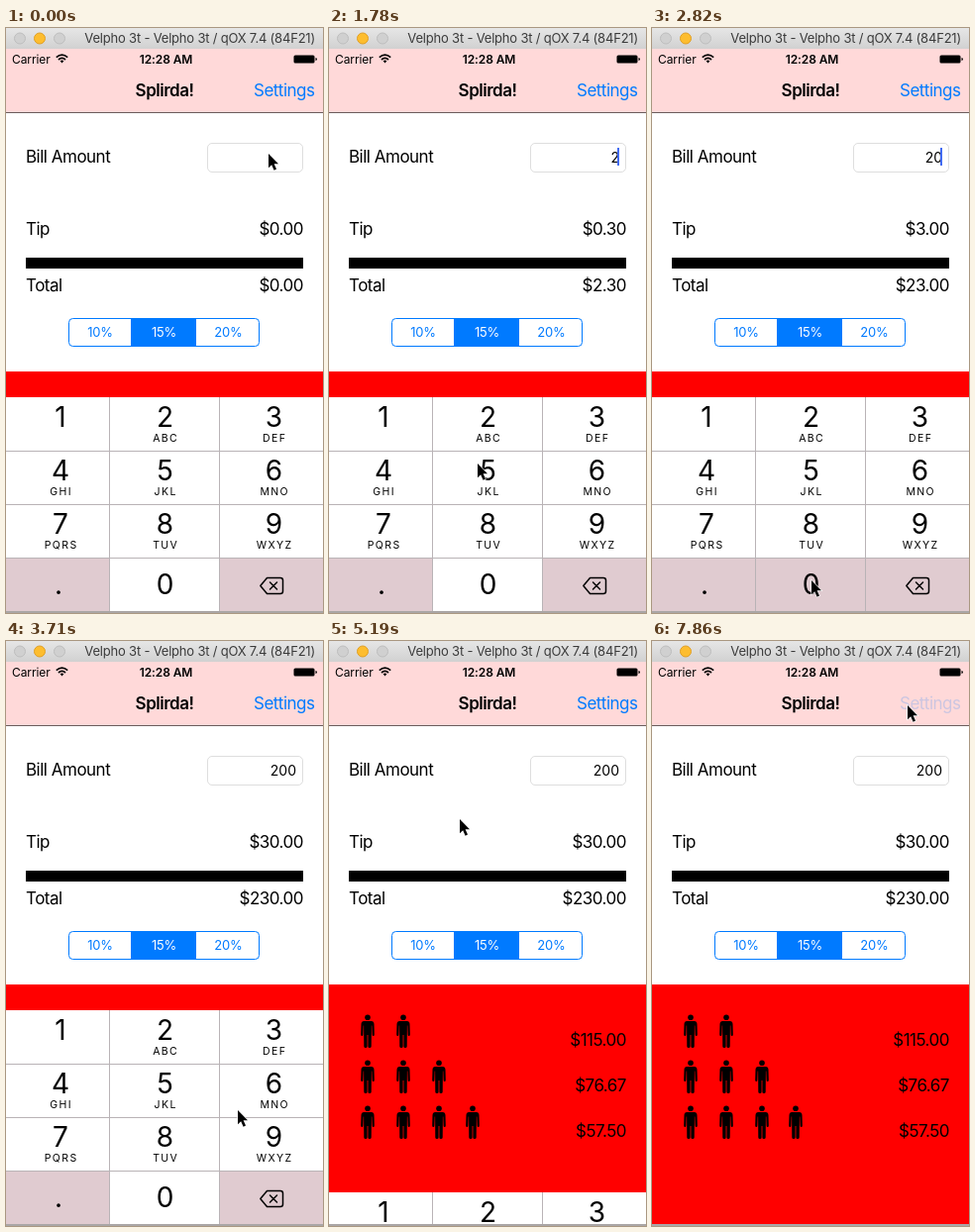
These frames come from a looping animation (320 by 591 pixels, 8 s). An HTML page:

```html
<!DOCTYPE html>
<html lang="en">
<head>
<meta charset="utf-8">
<title>Tip calculator</title>
<style>
  html, body { margin: 0; width: 100%; height: 100%; overflow: hidden; background: #fff; }
  svg { display: block; width: 320px; height: 591px; }
  text { font: 17px Inter, Roboto, sans-serif; letter-spacing: -.5px; }
  .end { text-anchor: end; }
  .mid { text-anchor: middle; }
  .bold { font-weight: 600; }
  .blue { fill: #007aff; }
  .small { font-size: 12px; letter-spacing: -.1px; }
  .window { font-size: 13px; letter-spacing: -.2px; fill: #3b3b3b; }
  .field { font-size: 14px; letter-spacing: 0; }
  .segment { font-size: 13px; letter-spacing: -.2px; }
  .digit { font-size: 28px; letter-spacing: 0; }
  .letters { font-size: 10.5px; letter-spacing: 1.4px; }
</style>
</head>
<body>
<svg viewBox="0 0 320 591">
  <defs>
    <linearGradient id="chrome" x2="0" y2="1">
      <stop stop-color="#e6e6e6"/><stop offset="1" stop-color="#d1d1d1"/>
    </linearGradient>
    <clipPath id="screen"><rect y="347" width="320" height="242"/></clipPath>
    <g id="person">
      <circle cy="3.2" r="2.8"/>
      <path d="M-3.8 7H3.8Q6.3 7 6.5 10L6.8 20.5Q6.8 22 5.7 22T4.6 20.5L4.3 11.5H3.9L3.7 32.5Q3.6 34 2 34T.4 32.5V21H-.4V32.5Q-.4 34-2 34T-3.7 32.5L-3.9 11.5H-4.3L-4.6 20.5Q-4.6 22-5.7 22T-6.8 20.5L-6.5 10Q-6.3 7-3.8 7Z"/>
    </g>
  </defs>

  <rect width="320" height="591" fill="#fff"/>
  <rect width="320" height="21" fill="url(#chrome)"/>
  <g stroke="#bebebe" fill="#d0d0d0">
    <circle cx="14" cy="10.5" r="5.5"/>
    <circle cx="34" cy="10.5" r="5.5" fill="#fdbd2f" stroke="#e0a028"/>
    <circle cx="54" cy="10.5" r="5.5"/>
  </g>
  <text class="window end" x="312" y="15">Velpho 3t - Velpho 3t / qOX 7.4 (84F21)</text>

  <rect y="21" width="320" height="64" fill="#ffd9d9"/>
  <rect y="85" width="320" height="1" fill="#6b5c5c"/>
  <text class="small" x="6" y="35.5">Carrier</text>
  <g fill="none" stroke="#000" stroke-width="1.7">
    <path d="M50.8 29.6Q56.5 24.6 62.2 29.6M53 32Q56.5 28.9 60 32"/>
    <path d="M54.6 33.3Q56.5 31.7 58.4 33.3L56.5 35.4Z" fill="#000" stroke="none"/>
  </g>
  <text class="small bold mid" x="161.5" y="35.5">12:28 AM</text>
  <rect x="290.5" y="27.5" width="21" height="8" rx="1.5" fill="#000"/>
  <path d="M312.5 30Q314 30.3 314 31.5T312.5 33Z"/>
  <text class="bold mid" x="160" y="69">Splirda!</text>
  <text id="settings" class="blue end" x="311.5" y="69">Settings</text>

  <text x="20" y="135.5">Bill Amount</text>
  <rect x="203.5" y="116.5" width="96" height="29" rx="4.5" fill="#fff" stroke="#dedede"/>
  <text id="bill" class="field end" x="293" y="135.5"></text>
  <rect id="caret" x="291" y="121" width="2" height="18" fill="#426bf2"/>
  <text x="20" y="208.5">Tip</text>
  <text id="tip" class="end" x="300" y="208.5"></text>
  <rect x="20" y="232" width="280" height="11"/>
  <text x="20" y="265.5">Total</text>
  <text id="total" class="end" x="300" y="265.5"></text>

  <rect x="63.5" y="293.5" width="192" height="28" rx="4" fill="#fff" stroke="#007aff"/>
  <rect class="blue" x="126" y="293" width="66" height="29"/>
  <text class="segment blue mid" x="95" y="312">10%</text>
  <text class="segment mid" x="159.5" y="312" fill="#fff">15%</text>
  <text class="segment blue mid" x="224.5" y="312">20%</text>

  <rect y="347" width="320" height="242" fill="#f00"/>
  <g id="split"></g>
  <g clip-path="url(#screen)"><g id="keypad"></g></g>
  <rect y="589" width="320" height="2" fill="#aaa6a6"/>

  <path id="cursor" d="M0 0V14.2L3.2 11.2L5.6 16.7L8 15.6L5.6 10.3H10Z" stroke="#fff" stroke-width="1.2" paint-order="stroke"/>
</svg>
<script>
const LOOP = 8000, TICK = 148.2;
const GREY_KEY = '#e0cbd0';
const $ = id => document.getElementById(id);
const money = value => '$' + value.toFixed(2);
const label = (cls, x, y, s) => `<text class="${cls}" x="${x}" y="${y}">${s}</text>`;

// Share of the bill for two, three and four people
$('split').innerHTML = [2, 3, 4].map((count, row) => {
  const y = 377 + 46 * row;
  const people = [39, 75, 111, 145].slice(0, count)
    .map(x => `<use href="#person" x="${x}" y="${y}"/>`).join('');
  return people + label('end', 300, y + 32, money(230 / count));
}).join('');

const columns = [[0, 104, 55], [105, 110, 160.5], [216, 104, 270.5]];
const keys = ['1', '2 ABC', '3 DEF', '4 GHI', '5 JKL', '6 MNO', '7 PQRS', '8 TUV', '9 WXYZ', '.', '0', ''];
$('keypad').innerHTML = '<rect y="373" width="320" height="216" fill="#b9b3b6"/>' +
  keys.map((key, i) => {
    const [digit, letters = ''] = key.split(' ');
    const [x, width, center] = columns[i % 3];
    const row = Math.floor(i / 3), y = 373 + 54 * row;
    const fill = digit === '.' || !digit ? GREY_KEY : '#fff';
    return `<rect id="key${digit}" x="${x}" y="${y + (row ? 1 : 0)}" width="${width}" height="${row ? 53 : 54}" fill="${fill}"/>` +
      label('digit mid', digit === '.' ? 53 : center, y + (row < 3 ? 30 : 37), digit) +
      label('letters mid', center + .7, y + 45, letters);
  }).join('') +
  `<g fill="none" stroke="#000" stroke-width="1.5" stroke-linejoin="round" stroke-linecap="round">
    <path d="M263.5 555.5H277Q279.5 555.5 279.5 558V569Q279.5 571.5 277 571.5H263.5L256.8 563.5Z"/>
    <path d="M266.5 560L273.5 567M273.5 560L266.5 567"/></g>`;

// Pointer waypoints: tick, x, y
const path = [
  [0, 265, 127], [3, 265, 127], [4, 258, 150], [6, 190, 340], [7, 147, 434], [8, 147, 408],
  [11, 147, 408], [12, 150, 440], [14, 160, 545], [15, 161, 558], [22, 161, 558],
  [23, 178, 545], [25, 234, 474], [26, 234, 474], [27, 225, 445], [30, 160, 240], [32, 132, 180],
  [43, 132, 180], [44, 152, 160], [47, 235, 88], [49, 258, 65], [60, 258, 65]
];

function pointerAt(tick) {
  const i = path.findIndex(p => p[0] > tick);
  const [t0, x0, y0] = path[i - 1], [t1, x1, y1] = path[i];
  const k = (tick - t0) / (t1 - t0);
  return [x0 + (x1 - x0) * k, y0 + (y1 - y0) * k];
}

const within = (tick, ...spans) => spans.some(([from, to]) => tick >= from && tick < to);

function draw(tick) {
  const bill = tick < 10 ? 0 : tick < 17 ? 2 : tick < 21 ? 20 : 200;
  $('bill').textContent = bill || '';
  $('tip').textContent = money(bill * .15);
  $('total').textContent = money(bill * 1.15);

  const caretOn = within(tick, [1, 5], [7, 10], [12, 24], [27, 31]);
  $('caret').setAttribute('visibility', caretOn ? 'visible' : 'hidden');
  $('key2').setAttribute('fill', within(tick, [8, 10]) ? GREY_KEY : '#fff');
  $('key0').setAttribute('fill', within(tick, [16, 17], [19, 21]) ? GREY_KEY : '#fff');
  $('settings').setAttribute('opacity', tick >= 53 ? .2 : 1);

  const slide = tick < 35 ? 0 : tick < 38 ? 216 * (1 - .148 ** (tick - 34)) : 217;
  $('keypad').setAttribute('transform', `translate(0 ${Math.round(slide)})`);
  $('cursor').setAttribute('transform', `translate(${pointerAt(tick).map(Math.round)})`);
}

const start = performance.now();
function frame() {
  const time = (performance.now() - start) % LOOP;
  draw(Math.min(53, Math.floor((time + 9) / TICK)));
  requestAnimationFrame(frame);
}
frame();
</script>
</body>
</html>
```
